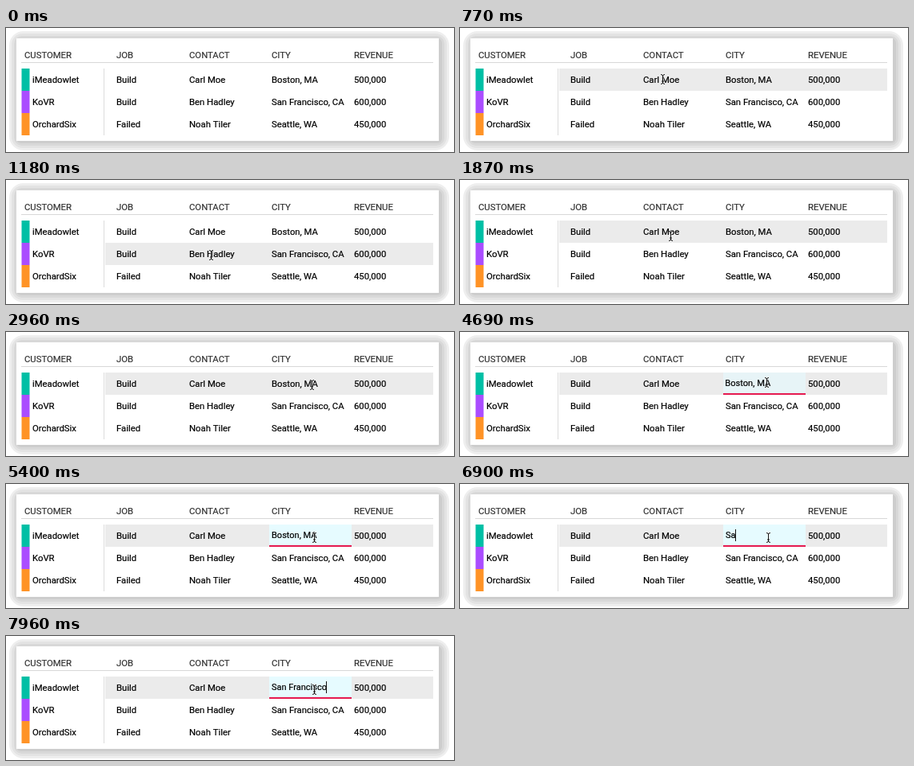
An HTML page with a canvas that plays this animation: 560 by 156 pixels, repeating every 8000 ms.

```html
<!DOCTYPE html>
<html lang="en">
<head>
<meta charset="utf-8">
<title>Inline table editing</title>
<style>
html, body { margin: 0; width: 100%; height: 100%; overflow: hidden; background: #fff; }
canvas { display: block; width: 560px; height: 156px; }
</style>
</head>
<body>
<canvas id="stage" width="560" height="156"></canvas>
<script>
const LOOP = 8000;
const ctx = document.getElementById('stage').getContext('2d');
const FAMILY = 'Roboto, Arial, sans-serif';
const COLS = [33, 138, 229, 332, 435];
const HEADS = ['CUSTOMER', 'JOB', 'CONTACT', 'CITY', 'REVENUE'];
const ROWS = [
  { color: '#00bfa5', cells: ['iMeadowlet', 'Build', 'Carl Moe', 'Boston, MA', '500,000'] },
  { color: '#aa4dff', cells: ['KoVR', 'Build', 'Ben Hadley', 'San Francisco, CA', '600,000'] },
  { color: '#ff9326', cells: ['OrchardSix', 'Failed', 'Noah Tiler', 'Seattle, WA', '450,000'] }
];
const TOP = 51, ROW_H = 28;
const ENTER = 360, CLICK = 3260, EDIT = 3430, FOCUS = 4500, CLEAR = 6480;

const MOVES = [
  { from: 360, to: 1120, x: 254, y: 78 },
  { from: 1120, to: 1400, x: 258, y: 119 },
  { from: 1580, to: 1870, x: 263, y: 70 },
  { from: 2390, to: 2960, x: 382, y: 66 },
  { from: 3430, to: 3790, x: 390, y: 66 },
  { from: 4030, to: 4330, x: 383, y: 63 },
  { from: 4980, to: 5400, x: 385, y: 67 }
];

// Bursts of typing: first and last key press
const BURSTS = [
  { text: 'San', from: 6780, to: 6960 },
  { text: ' Fran', from: 7140, to: 7490 },
  { text: 'cisco', from: 7670, to: 7950 }
];

const progress = (t, from, to) => Math.max(0, Math.min(1, (t - from) / (to - from)));
const easeOut = k => 1 - (1 - k) ** 2;

function pointerAt(t) {
  let x = 250, y = 13;
  for (const m of MOVES) {
    const k = easeOut(progress(t, m.from, m.to));
    x += (m.x - x) * k;
    y += (m.y - y) * k;
  }
  return { x: Math.round(x), y: Math.round(y) };
}

function typedAt(t) {
  return BURSTS.map(({ text, from, to }) => {
    const count = t < from ? 0 : 1 + Math.floor(progress(t, from, to) * (text.length - 1));
    return text.slice(0, count);
  }).join('');
}

function box(x, y, w, h, color) {
  ctx.fillStyle = color;
  ctx.fillRect(x, y, w, h);
}

function label(text, x, y, color = '#000', size = 11.3) {
  ctx.font = `${size}px ${FAMILY}`;
  ctx.fillStyle = ctx.strokeStyle = color;
  ctx.lineWidth = .2;
  ctx.fillText(text, x, y);
  ctx.strokeText(text, x, y);
}

function drawCard() {
  box(0, 0, 560, 156, '#fff');
  for (let i = 0; i < 4; i++) {
    const inset = 3 * i, grey = 238 - 11 * i;
    ctx.fillStyle = `rgb(${grey},${grey},${grey})`;
    ctx.beginPath();
    ctx.roundRect(4 + inset, 4 + inset, 550 - 2 * inset, 150 - 2 * inset, 18 - 4 * i);
    ctx.fill();
  }
  box(13, 13, 528, 129, '#fff');
  HEADS.forEach((h, i) => label(h, i ? COLS[i] : 23, 38, '#333'));
  box(19, 43, 515, 1, '#d8d8d8');
  box(122, TOP, 1, ROW_H * 3, '#dcdcdc');
}

function drawRows(t, hover) {
  ROWS.forEach((row, r) => {
    const y = TOP + r * ROW_H;
    box(19.5, y, 10, ROW_H, row.color);
    if (r === hover) box(124, y, 410, ROW_H, '#ebebeb');
    row.cells.forEach((cell, c) => {
      const editing = r === 0 && c === 3 && t >= EDIT;
      if (!editing) label(cell, COLS[c], y + 18);
    });
  });
}

function drawEditor(t) {
  if (t < EDIT) return;
  const half = 51.5 * easeOut(progress(t, EDIT - 30, EDIT + 330));
  const focus = progress(t, FOCUS, FOCUS + 300);
  ctx.globalAlpha = focus;
  box(329, TOP, 103, 26, '#e6fbff');
  ctx.globalAlpha = 1;
  box(380.5 - half, 77, half * 2, 2, '#e5194f');

  if (t < CLEAR) {
    label('Boston, MA', 330 + 2 * focus, 68, '#000', 11.3 - .3 * focus);
    return;
  }
  const text = typedAt(t);
  label(text, 332, 68, '#000', 11);
  box(Math.round(331.5 + ctx.measureText(text).width), 57, 1, 15, '#111');
}

function drawArrow(x, y) {
  const outline = [[0, 0], [0, 10], [2.3, 8], [4, 12], [5.8, 11.2], [4.2, 7.3], [7.2, 7.3]];
  ctx.beginPath();
  outline.forEach(([dx, dy]) => ctx.lineTo(x + dx, y + dy));
  ctx.closePath();
  ctx.lineWidth = 1.5;
  ctx.strokeStyle = '#fff';
  ctx.stroke();
  ctx.fillStyle = '#000';
  ctx.fill();
}

function drawBeam(x, y) {
  ctx.beginPath();
  for (const s of [-1, 1]) {
    ctx.moveTo(x - 2.5, y + 6 * s);
    ctx.quadraticCurveTo(x, y + 6 * s, x, y + 4 * s);
    ctx.quadraticCurveTo(x, y + 6 * s, x + 2.5, y + 6 * s);
  }
  ctx.moveTo(x, y - 5);
  ctx.lineTo(x, y + 5);
  ctx.moveTo(x - 1.5, y + 2.5);
  ctx.lineTo(x + 1.5, y + 2.5);
  for (const [width, color] of [[2.4, 'rgba(255,255,255,.6)'], [1, '#111']]) {
    ctx.lineWidth = width;
    ctx.strokeStyle = color;
    ctx.stroke();
  }
}

function drawPointer(t, { x, y }) {
  if (t < ENTER || (t >= CLICK && t < EDIT)) return;
  const overForm = t >= EDIT && t < FOCUS;
  if (y < TOP || overForm) drawArrow(x, y);
  else drawBeam(x + .5, y + .5);
}

function frame(now) {
  const t = now % LOOP;
  const pointer = pointerAt(t);
  drawCard();
  drawRows(t, Math.floor((pointer.y - TOP) / ROW_H));
  drawEditor(t);
  drawPointer(t, pointer);
  requestAnimationFrame(frame);
}
requestAnimationFrame(frame);
</script>
</body>
</html>
```
